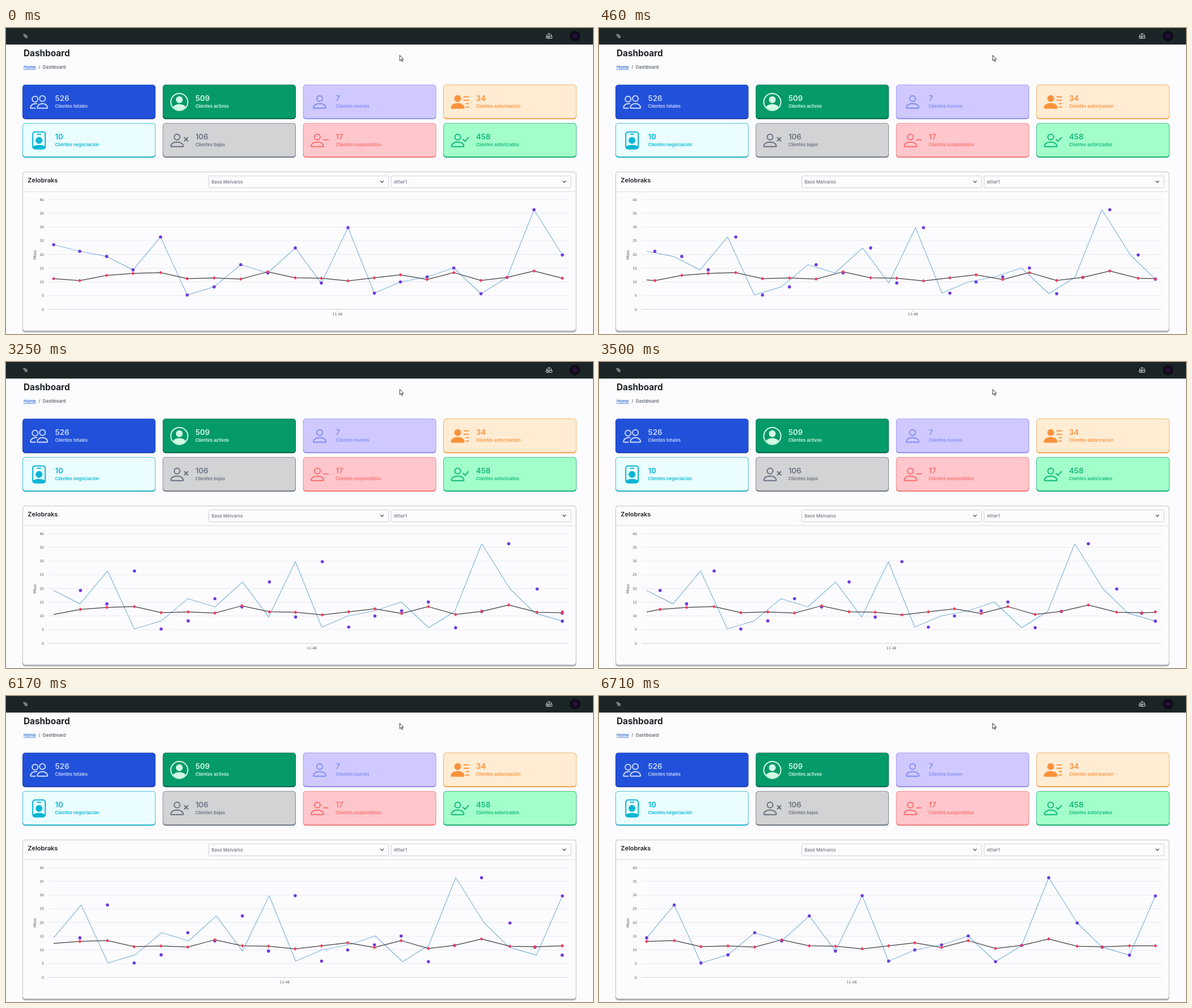
An HTML page that plays this animation: 1035 by 541 pixels, repeating every 8000 ms.

```html
<!DOCTYPE html>
<html lang="es">
<head>
<meta charset="utf-8">
<title>Dashboard</title>
<style>
html, body { margin: 0; width: 100%; height: 100%; overflow: hidden; background: #fcfcff; }
svg { display: block; width: 100%; height: 100%; font-family: Inter, sans-serif; font-weight: 600; }
.icon { fill: none; stroke: currentColor; stroke-linecap: round; stroke-linejoin: round; }
.solid { fill: currentColor; stroke: none; }
.axis { font: 400 6.1px "DejaVu Sans", sans-serif; fill: #555; }
.field { font-size: 7.9px; font-weight: 500; fill: #727780; }
</style>
</head>
<body>
<svg id="stage" viewBox="0 0 1035 541">
  <defs>
    <radialGradient id="avatar"><stop offset="0" stop-color="#2d1440"/><stop offset="1" stop-color="#07060c"/></radialGradient>
  </defs>
  <rect width="1035" height="541" fill="#fcfcff"/>
  <rect width="1035" height="29.3" fill="#1b2426"/>
  <path d="M30 11.5h5.5M31 13.5h6.5M32 15.2h6M33.5 17h4.5" stroke="#cfd5d6" stroke-width=".9"/>
  <g fill="none" stroke="#eef1f1" stroke-width="1">
    <rect x="952.4" y="14.6" width="10.4" height="3.6" rx="1"/>
    <path d="M953.6 14.5v-3M961.6 14.5v-3M954.5 16.4h4M955 10.8q2.6-2.4 5.2 0M956.2 12.4q1.4-1.2 2.8 0"/>
  </g>
  <circle cx="1003.3" cy="14.2" r="9" fill="url(#avatar)"/>
  <text x="31" y="50" font-size="15.3" font-weight="700" fill="#1d2125">Dashboard</text>
  <g font-size="7.7" fill="#646c75">
    <text x="31" y="72" fill="#3a72d8" text-decoration="underline">Home</text>
    <text x="57.5" y="72">/</text>
    <text x="64.7" y="72">Dashboard</text>
  </g>
  <g id="cards"></g>

  <rect x="29" y="254" width="976.5" height="284.3" rx="5" fill="#b2b1b8"/>
  <rect x="29.8" y="254.8" width="974.9" height="280.2" rx="4.4" fill="#fcfcff"/>
  <path d="M30 289.5H1005" stroke="#dcdbe3"/>
  <text x="38.3" y="273" font-size="11" fill="#1d2125">Zelobraks</text>
  <g id="fields"></g>
  <g id="grid"></g>
  <text class="axis" text-anchor="middle" transform="translate(52.5 401) rotate(-90)" style="font-size:6.3px">Mbps</text>
  <g id="clock">
    <path d="M0 497.5v4.5" stroke="#d0d4e2" stroke-width=".8"/>
    <text class="axis" y="507.7" text-anchor="middle">11:48</text>
  </g>
  <path id="download" fill="none" stroke="#7db3dc" stroke-width="1.15" stroke-linejoin="round"/>
  <path id="dots" fill="#6f3ce0"/>
  <path id="upload" fill="none" stroke="#3f3f42" stroke-width="1.25" stroke-linejoin="round"/>
  <path id="diamonds" fill="#ec3f5f"/>
  <path d="M694.2 48.2v9.6l2.2-2 1.6 3.5 1.5-.7-1.6-3.3h2.9z" fill="#fff" stroke="#222" stroke-width=".9"/>
</svg>
<script>
const el = id => document.getElementById(id);

// Icons on a 16-unit grid
const user = '<circle cx="6" cy="5" r="2.5"/><path d="M1 13.5q-.5 0-.5-.5c0-1 1-3.5 5.5-3.5s5.5 2.5 5.5 3.5q0 .5-.5.5z"/>';
const icons = {
  people: '<circle cx="11" cy="5" r="2.5"/><path d="M6.5 13c0-1 1-3.5 4.5-3.5s4.5 2.5 4.5 3.5q0 .5-.5.5H7q-.5 0-.5-.5z"/>' +
    '<circle cx="4.5" cy="5.5" r="2.5"/><path d="M6 9.5H5C1.5 9.5.5 12 .5 13q0 .5.5.5h3.7"/>',
  round: '<circle cx="8" cy="8" r="7.5"/><circle class="solid" cx="8" cy="6" r="3"/>' +
    '<path class="solid" d="M2.5 12.4C3.2 11.2 4.8 10 8 10s4.8 1.2 5.5 2.4A7 7 0 0 1 2.5 12.4z"/>',
  user: `<g transform="translate(2 0)">${user}</g>`,
  lines: '<circle class="solid" cx="6" cy="5" r="3"/><path class="solid" d="M1 14s-1 0-1-1 1-4 6-4 6 3 6 4-1 1-1 1z"/>' +
    '<path d="M11.5 3.5h4M11.5 6.5h4M13.5 9.5h2M13.5 12.5h2"/>',
  badge: '<rect x="2.5" y=".5" width="11" height="15" rx="2"/><path d="M6.5 2.5h3"/><circle class="solid" cx="8" cy="8" r="3"/>' +
    '<path class="solid" d="M2.5 13.6C4 12.5 5.6 12 8 12s4 .5 5.5 1.6v.4q0 1.5-1.5 1.5H4q-1.5 0-1.5-1.5z"/>',
  cross: user + '<path d="M12.5 5.5l3 3M15.5 5.5l-3 3"/>',
  minus: user + '<path d="M11.5 7.5h4"/>',
  check: user + '<path d="M10.8 7.2l1.7 1.6 3-3.3"/>'
};

// count, label, icon, fill, edge, ink
const cards = [
  [526, 'totales', 'people', '#2150da', '#183eb0', '#cbd9fb'],
  [509, 'activos', 'round', '#059a69', '#056548', '#d1fae5'],
  [7, 'nuevos', 'user', '#d0c9ff', '#8e8cf0', '#818cf8'],
  [34, 'autorizacion', 'lines', '#ffecd3', '#f0a24a', '#fb923c'],
  [10, 'negociacion', 'badge', '#ebfeff', '#18adc6', '#06b6d4'],
  [106, 'bajas', 'cross', '#d2d3d5', '#6b7280', '#6b7280'],
  [17, 'suspendidos', 'minus', '#ffc6cb', '#ef7676', '#f87171'],
  [458, 'autorizados', 'check', '#a3ffca', '#14ab70', '#12b87c']
];
el('cards').innerHTML = cards.map(([count, label, icon, fill, edge, ink], i) => `
  <g transform="translate(${29 + i % 4 * 247.4} ${i < 4 ? 100.3 : 168.2})" color="${ink}">
    <rect width="234.6" height="61" rx="5" fill="${edge}"/>
    <rect x=".8" y=".8" width="233" height="58.2" rx="4.3" fill="${fill}"/>
    <g class="icon" transform="translate(13.2 14.5) scale(2)">${icons[icon]}</g>
    <text x="57.5" y="28.6" font-size="13.3" fill="${ink}">${count}</text>
    <text x="57.5" y="40.6" font-size="7.7" fill="${ink}">Clientes ${label}</text>
  </g>`).join('');

el('fields').innerHTML = [[357.5, 'Base Melvaros'], [679, 'ether1']].map(([x, label]) => `
  <g transform="translate(${x} 261.5)">
    <rect width="317" height="21" rx="2" fill="#fcfcff" stroke="#cfcfd8"/>
    <text class="field" x="4.9" y="13.4">${label}</text>
    <path d="M302.6 8.7l2.9 2.9 2.9-2.9" fill="none" stroke="#343a40" stroke-width="1.2"/>
  </g>`).join('');

const LEFT = 84, RIGHT = 981, SHOWN = 20;
const yOf = value => 497.4 - value * 4.845;
el('grid').innerHTML = Array.from({length: 9}, (_, i) => `
  <path d="M75 ${yOf(i * 5)}H991" stroke="${i ? '#e7e7f1' : '#d0d2dc'}"/>
  <text class="axis" x="67" y="${yOf(i * 5) + 2.2}" text-anchor="end">${i * 5}</text>`).join('');

const times = [84, 130, 177.5, 224, 272.5, 319.5, 367, 414, 461.5, 510, 556, 603, 649.5, 695.5, 742.5, 789.5,
  837.5, 883.5, 931, 981, 1025, 1073, 1118.5];
const down = [23.6, 21.2, 19.3, 14.4, 26.4, 5.25, 8.2, 16.3, 13.3, 22.4, 9.6, 29.8, 5.9, 10, 11.85, 15.1,
  5.7, 11.65, 36.35, 19.85, 11, 8.1, 29.7];
const up = [11.2, 10.5, 12.4, 13.1, 13.4, 11.2, 11.45, 11.05, 13.7, 11.5, 11.35, 10.4, 11.5, 12.6, 10.9, 13.4,
  10.55, 11.65, 14, 11.35, 11.15, 11.5, 11.5];
const shifts = [
  {at: 40, start: 62, length: 640},
  {at: 3250, start: 3220, length: 560},
  {at: 6170, start: 6140, length: 560}
];

const lerp = (a, b, p) => a + (b - a) * p;
const xOf = (time, first) =>
  LEFT + (time - times[first]) / (times[first + SHOWN - 1] - times[first]) * (RIGHT - LEFT);
const line = points => 'M' + points.map(([x, v]) => `${x.toFixed(2)} ${yOf(v).toFixed(2)}`).join('L');
const marks = (points, shape) => points.map(([x, v]) => `M${x.toFixed(2)} ${yOf(v).toFixed(2)}${shape}`).join('');

function draw(now) {
  const t = now % 8000;
  const first = shifts.filter(s => t >= s.at).length;
  const last = first + SHOWN - 1;
  const before = Math.max(first - 1, 0);
  let p = 1;
  if (first) {
    const {start, length} = shifts[first - 1];
    const linear = Math.min(1, Math.max(0, (t - start) / length));
    p = (1 - Math.cos(Math.PI * linear)) / 2;
  }
  const slide = time => lerp(xOf(time, before), xOf(time, first), p);
  const visible = times.map((_, i) => i).slice(first, last + 1);
  const markers = data => visible.map(i => [i === last ? RIGHT : slide(times[i]), data[i]]);
  const upMarkers = markers(up);

  // The blue line jumps at once; the dark one travels with its markers.
  el('download').setAttribute('d', line(visible.map(i => [xOf(times[i], first), down[i]])));
  el('upload').setAttribute('d', line([
    [LEFT, lerp(up[before], up[first], p)],
    ...upMarkers.slice(0, -1),
    [RIGHT, lerp(up[last - 1], up[last], p)]
  ]));
  el('dots').setAttribute('d', marks(markers(down), 'm-2.8 0a2.8 2.8 0 1 0 5.6 0a2.8 2.8 0 1 0-5.6 0z'));
  el('diamonds').setAttribute('d', marks(upMarkers, 'm0-3.1l3.1 3.1-3.1 3.1-3.1-3.1z'));
  el('clock').setAttribute('transform', `translate(${slide(584.5).toFixed(2)} 0)`);
}

let origin;
function tick(now) {
  origin ??= now;
  draw(now - origin);
  requestAnimationFrame(tick);
}
draw(0);
requestAnimationFrame(tick);
</script>
</body>
</html>
```
